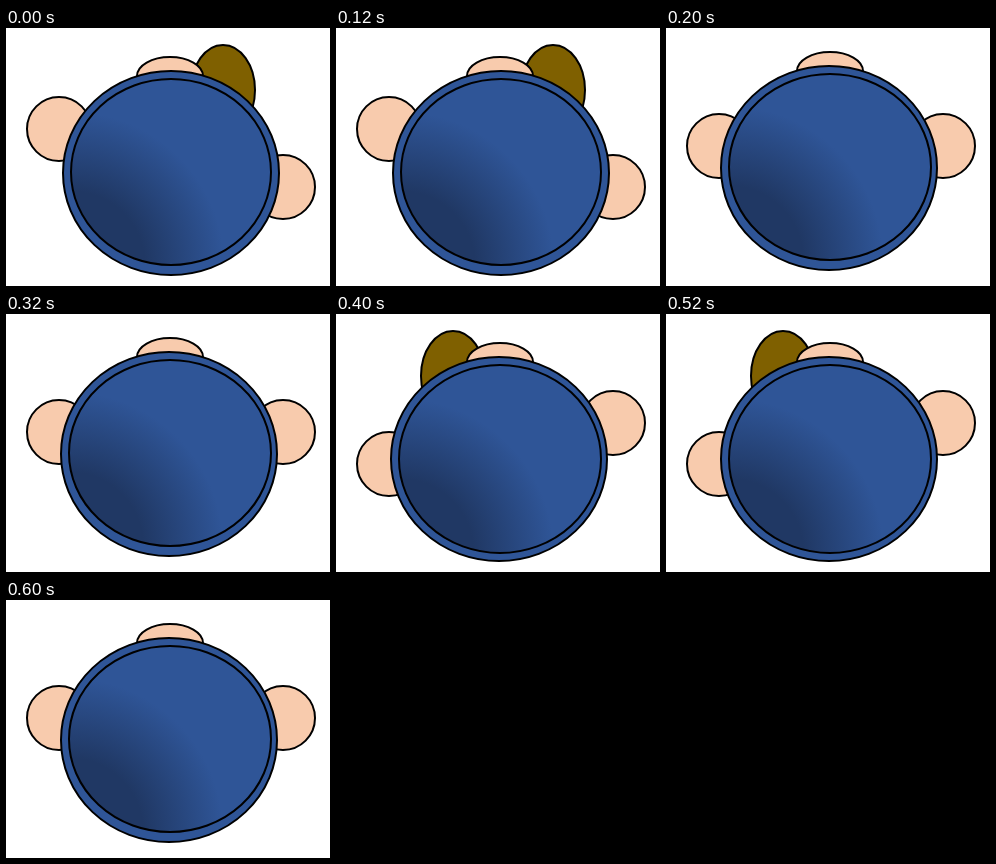
Write an HTML page with a canvas that moves like this. It is 324x258 px and loops after 0.8 s.

```html
<!DOCTYPE html>
<html lang="en">
<head>
<meta charset="utf-8">
<title>Walking figure</title>
<style>
  html, body { margin: 0; width: 100%; height: 100%; overflow: hidden; background: #fff; }
  canvas { display: block; }
</style>
</head>
<body>
<canvas id="stage" width="324" height="258"></canvas>
<script>
const ctx = document.getElementById('stage').getContext('2d');
const STEP = 200;
const SKIN = '#f8cbad', SHOE = '#7f6000', RIM = '#2f5597', SHADE = '#203864';

// Hand heights, body centre, inner disc and foot position for each pose
const rest = { left: 118, right: 118, x: 163, y: 140, face: [164, 139, 101, 93] };
const poses = [
  { left: 101, right: 159, x: 165, y: 145, face: [165, 144, 100, 93], foot: 217 },
  rest,
  { left: 150, right: 109, x: 163, y: 145, face: [164, 145, 101, 94], foot: 117 },
  rest
];

function oval(x, y, rx, ry, fill) {
  ctx.beginPath();
  ctx.ellipse(x, y, rx, ry, 0, 0, Math.PI * 2);
  ctx.fillStyle = fill;
  ctx.fill();
  ctx.stroke();
}

function shading(x, y, rx, ry) {
  const left = x - rx, bottom = y + ry;
  const g = ctx.createRadialGradient(left, bottom, 0, left, bottom, Math.hypot(rx, ry) * 2);
  g.addColorStop(0, SHADE);
  g.addColorStop(0.27, SHADE);
  g.addColorStop(0.56, RIM);
  return g;
}

function draw(pose) {
  ctx.fillStyle = '#fff';
  ctx.fillRect(0, 0, 324, 258);
  ctx.strokeStyle = '#000';
  ctx.lineWidth = 2;
  if (pose.foot) oval(pose.foot, 62, 32, 45, SHOE);
  oval(53, pose.left, 32, 32, SKIN);
  oval(277, pose.right, 32, 32, SKIN);
  oval(164, pose.y - 97, 33, 19, SKIN);
  oval(pose.x, pose.y, 108, 102, RIM);
  oval(...pose.face, shading(...pose.face));
}

function tick(now) {
  draw(poses[Math.floor(now / STEP) % poses.length]);
  requestAnimationFrame(tick);
}

draw(poses[0]);
requestAnimationFrame(tick);
</script>
</body>
</html>
```
